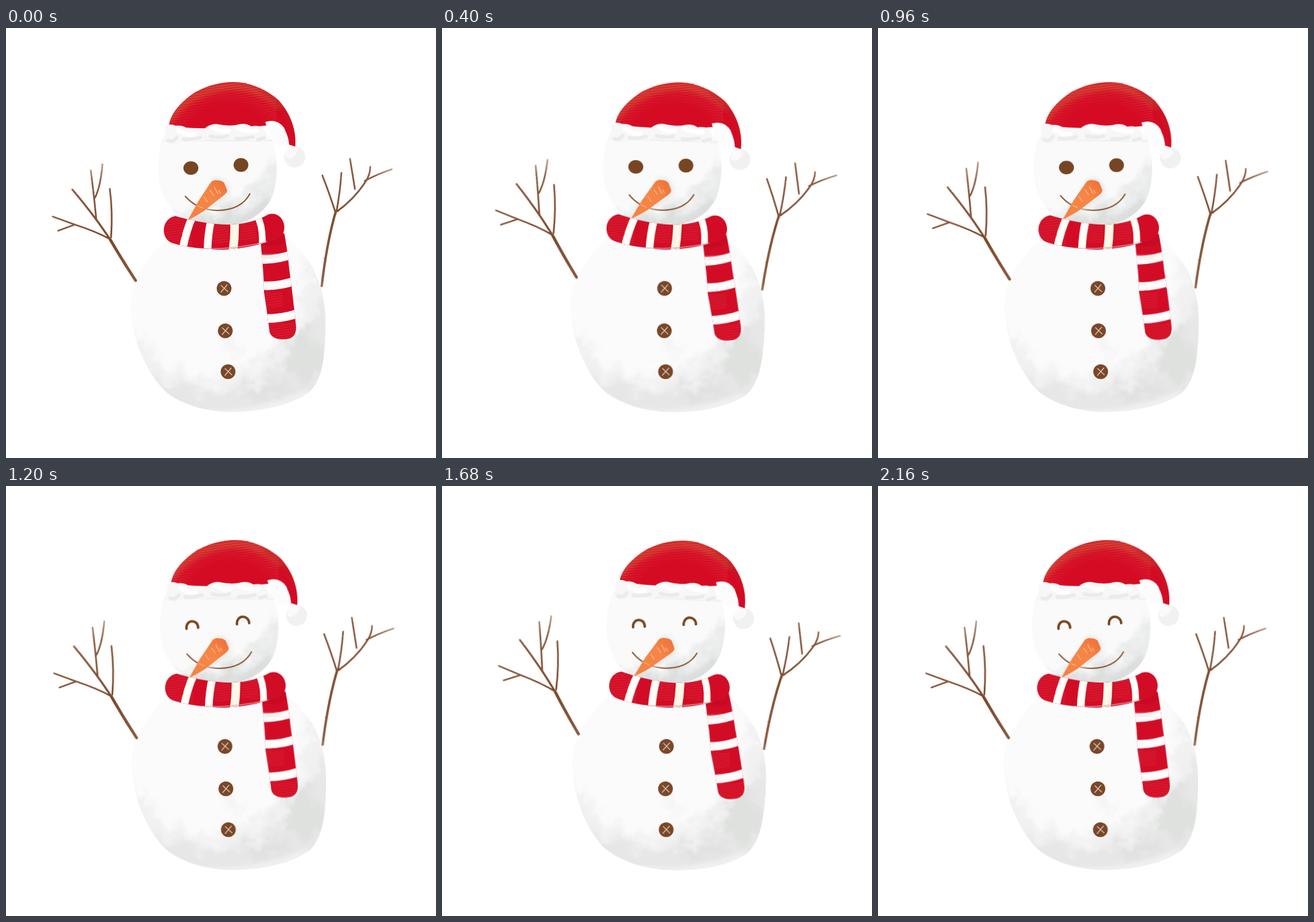
An HTML page for the animation above (2240 ms loop, 700 by 700 pixels).

```html
<!DOCTYPE html>
<html lang="en">
<head>
<meta charset="utf-8">
<title>Swaying snowman</title>
<style>
  html, body { margin: 0; width: 100%; height: 100%; overflow: hidden; background: #fff; }
  svg { display: block; width: 100%; height: 100%; }
  .line { fill: none; stroke-linecap: round; stroke-linejoin: round; }

  /* seven even steps out, seven back */
  .snowman { transform-origin: 362px 628px; --turn: 2.9deg; }
  .tail { transform-origin: 432px 345px; --turn: -5.3deg; }
  .snowman, .tail { animation: sway 1120ms -2ms infinite; }
  @keyframes sway {
    0%, 100% { transform: rotate(0deg); animation-timing-function: steps(7); }
    50% { transform: rotate(var(--turn)); animation-timing-function: steps(7); }
  }

  /* eyes open for one sway, smiling for the next */
  .open, .shut { animation: blink 2240ms -2ms step-end infinite; }
  .shut { animation-delay: -1122ms; }
  @keyframes blink { 0% { opacity: 1; } 50%, 100% { opacity: 0; } }
</style>
</head>
<body>
<svg viewBox="0 0 700 700">
  <defs>
    <filter id="rough" filterUnits="userSpaceOnUse" x="0" y="0" width="700" height="700" color-interpolation-filters="sRGB">
      <feTurbulence type="fractalNoise" baseFrequency=".35" numOctaves="1" seed="4"/>
      <feDisplacementMap in="SourceGraphic" scale="1.8" xChannelSelector="R" yChannelSelector="G"/>
    </filter>
    <filter id="wash" filterUnits="userSpaceOnUse" x="0" y="0" width="700" height="700" color-interpolation-filters="sRGB">
      <feGaussianBlur stdDeviation="7" result="soft"/>
      <feTurbulence type="fractalNoise" baseFrequency=".04" numOctaves="3" seed="9"/>
      <feDisplacementMap in="soft" scale="50" xChannelSelector="R" yChannelSelector="G"/>
    </filter>
    <filter id="soft" x="-40%" y="-40%" width="180%" height="180%"><feGaussianBlur stdDeviation="3.5"/></filter>

    <pattern id="knit" width="4" height="4" patternUnits="userSpaceOnUse" patternTransform="rotate(-8)">
      <path d="M0 1 2 3 4 1" fill="none" stroke="#f0a184" stroke-width=".8"/>
    </pattern>
    <radialGradient id="hatFade" gradientUnits="userSpaceOnUse" cx="362" cy="188" r="110" gradientTransform="translate(362 188) scale(1.12 1) translate(-362 -188)">
      <stop offset=".58" stop-color="#fff" stop-opacity="0"/>
      <stop offset=".86" stop-color="#fff" stop-opacity=".55"/>
      <stop offset="1" stop-color="#fff" stop-opacity=".3"/>
    </radialGradient>
    <mask id="hatMask" maskUnits="userSpaceOnUse" x="250" y="80" width="190" height="90">
      <rect x="250" y="80" width="190" height="90" fill="url(#hatFade)"/>
    </mask>
    <radialGradient id="leftWood" gradientUnits="userSpaceOnUse" cx="170" cy="345" r="128">
      <stop offset="0" stop-color="#7b4829"/>
      <stop offset=".75" stop-color="#8b5d44"/>
      <stop offset="1" stop-color="#c7a99b"/>
    </radialGradient>
    <radialGradient id="rightWood" gradientUnits="userSpaceOnUse" cx="534" cy="315" r="128">
      <stop offset="0" stop-color="#7f4e31"/>
      <stop offset=".75" stop-color="#8b5d44"/>
      <stop offset="1" stop-color="#c3a294"/>
    </radialGradient>
    <linearGradient id="carrot" x1="0" y1="1" x2="1" y2="0">
      <stop offset="0" stop-color="#f5823f"/>
      <stop offset=".6" stop-color="#f58647"/>
      <stop offset="1" stop-color="#ee6f35"/>
    </linearGradient>

    <path id="bodyShape" d="M270 338C236 362 204 408 203 450C203 508 232 567 262 594C290 615 330 625 368 625C420 624 468 612 494 592C517 570 520 530 520 475C519 420 500 380 464 346C400 318 320 316 270 338Z"/>
    <path id="headShape" d="M256 178C245 205 244 248 257 275C270 304 300 322 345 323C390 323 424 302 435 270C444 238 441 203 432 178C390 140 300 140 256 178Z"/>
    <path id="hatShape" d="M265 160C268 138 286 119 309 104C330 93 350 88 370 88C397 88 426 101 444 118C463 139 473 166 471 193L461 190C460 179 457 170 450 161L430 158Q350 168 265 160Z"/>
    <path id="collarShape" d="M276 306C295 312 330 320 366 320C392 319 412 312 426 304C440 299 451 308 453 322C454 335 446 346 431 346C416 352 390 359 352 361C320 360 286 356 268 349C255 342 254 324 262 314Q268 307 276 306Z"/>
    <path id="tailShape" d="M414 338C416 370 420 400 420 430C424 456 427 476 429 495C433 507 448 508 459 506C470 504 473 495 472 484C469 455 465 420 461 392C459 370 456 350 453 334Z"/>
    <clipPath id="inBody"><use href="#bodyShape"/></clipPath>
    <clipPath id="inHead"><use href="#headShape"/></clipPath>
    <clipPath id="inHat"><use href="#hatShape"/></clipPath>
    <clipPath id="inCollar"><use href="#collarShape"/></clipPath>
    <clipPath id="inTail"><use href="#tailShape"/></clipPath>

    <g id="button">
      <circle r="12" fill="#7a4728"/>
      <path class="line" d="M-5-5 6 5M5-6-5 6" stroke="#d9c8bb" stroke-width="1.4"/>
    </g>
  </defs>

  <g class="snowman">
    <g filter="url(#rough)">
      <!-- body -->
      <use href="#bodyShape" fill="#fbfbfb"/>
      <g clip-path="url(#inBody)">
        <g filter="url(#wash)">
          <path d="M185 455Q225 530 300 570Q380 570 425 525Q470 500 485 430L490 370L560 400V650H200Z" fill="#f0f1f0"/>
          <path d="M225 560Q300 600 370 590Q440 570 485 505L515 440L560 560L480 650H270Z" fill="#e6e7e6"/>
          <ellipse cx="485" cy="535" rx="28" ry="38" fill="#dfe1df"/>
          <ellipse cx="425" cy="590" rx="48" ry="13" fill="#e0e1e0"/>
          <ellipse cx="368" cy="522" rx="12" ry="10" fill="#f3f3f3"/>
        </g>
        <path d="M330 621Q400 627 490 588L500 640H300Z" fill="#eff0ef" filter="url(#soft)"/>
      </g>

      <!-- arms -->
      <g class="line" stroke="url(#leftWood)" stroke-width="2.8">
        <path d="M211 411Q188 376 170 345" stroke-width="4.6"/>
        <path d="M172 348Q158 327 147 312Q126 284 108 263" stroke-width="3.3"/>
        <path d="M170 344Q146 331 112 320L76 307M112 320 85 330"/>
        <path d="M171 341Q174 300 169 262M147 312Q143 270 138 232M145 276Q154 258 157 222"/>
      </g>
      <g class="line" stroke="url(#rightWood)" stroke-width="2.8">
        <path d="M514 420Q522 350 537 298" stroke-width="3.9"/>
        <path d="M537 302Q526 268 515 240M538 299Q544 266 546 236"/>
        <path d="M537 300Q568 278 586 249Q593 238 593 226M568 262 560 213"/>
        <path d="M584 249Q604 238 628 230"/>
      </g>

      <!-- head -->
      <use href="#headShape" fill="#fafafa"/>
      <g clip-path="url(#inHead)">
        <g filter="url(#wash)">
          <path d="M255 290Q320 312 375 280Q410 270 430 220L470 200L460 340H260Z" fill="#eaebeb"/>
          <path d="M285 318Q350 312 400 295L440 265V345H290Z" fill="#dcdede"/>
        </g>
        <path d="M262 184Q340 180 430 184" class="line" stroke="#eff0f0" stroke-width="10" filter="url(#soft)"/>
      </g>

      <!-- hat -->
      <use href="#hatShape" fill="#d50b24"/>
      <g clip-path="url(#inHat)">
        <path d="M268 145Q300 103 363 94Q405 92 445 125" class="line" stroke="#cf3a2c" stroke-width="14" filter="url(#soft)" opacity=".7"/>
        <rect x="250" y="80" width="190" height="90" fill="url(#knit)" mask="url(#hatMask)"/>
        <path d="M420 105Q455 130 468 165" class="line" stroke="#c11c27" stroke-width="7" filter="url(#soft)" opacity=".6"/>
      </g>
      <path d="M422 153Q442 147 453 163Q460 178 459 194L440 190Q428 176 422 153Z" fill="#fcfcfc"/>
      <circle cx="470" cy="210" r="17" fill="#f1f1f1"/>
      <path d="M454 203Q459 190 470 193Q478 198 472 205Q464 215 456 211Z" fill="#fafafa"/>
      <path d="M258 161Q265 154 276 159Q288 158 296 164Q308 166 323 164Q334 154 347 157Q362 160 374 158Q389 153 399 160Q413 157 420 165Q427 174 422 183Q412 189 400 183Q382 185 365 181Q346 185 331 180Q314 187 298 184Q283 183 276 189Q261 192 256 181Q262 171 258 161Z" fill="#f7f7f7"/>
      <g class="line" stroke="#e8e9e9" stroke-width="6" opacity=".8">
        <path d="M264 183Q272 187 278 178M289 181Q304 182 316 178M333 176Q348 180 360 176M375 180Q390 181 402 177M410 182 420 179"/>
      </g>
      <path d="M281 167Q298 177 306 173M337 162Q349 171 362 167M377 163Q394 170 407 167" class="line" stroke="#fff" stroke-width="7"/>

      <!-- face -->
      <g class="open" fill="#774522">
        <ellipse cx="301" cy="228" rx="12.2" ry="11"/>
        <ellipse cx="382.5" cy="223" rx="12" ry="11.3"/>
      </g>
      <g class="shut line" stroke="#784720" stroke-width="4">
        <path d="M291 233C289 218 309 216 310 231"/>
        <path d="M373 225C372 209 392 209 393 223"/>
      </g>
      <path d="M292 274Q312 297 345 297Q383 296 397 270" class="line" stroke="#8a5a38" stroke-width="2.1"/>
      <path d="M337 246Q353 240 363 260Q364 272 350 282L325 300Z" fill="#e5e6e6" filter="url(#soft)"/>
      <path d="M296 313L313 282L333 252Q337 247 344 248Q351 248 355 252L360 264Q360 269 351 275L322 298Q308 307 296 313Z" fill="url(#carrot)"/>
      <path d="M332 264 338 272M339 259 345 270M346 264 349 269M322 275 328 283M311 289 320 293" class="line" stroke="#ffc49b" stroke-width="1.2"/>

      <!-- scarf -->
      <g class="tail">
        <use href="#tailShape" fill="#d30c26"/>
        <g clip-path="url(#inTail)">
          <path d="M425 480H475V510H425ZM420 430H450V455H420Z" fill="url(#knit)" opacity=".25"/>
          <path d="M415 345Q436 358 454 340" class="line" stroke="#b10d23" stroke-width="5" filter="url(#soft)" opacity=".7"/>
          <g class="line" stroke="#fdfcfb" stroke-width="14">
            <path d="M410 376Q437 379 468 368M412 419Q442 422 472 411M418 473Q449 474 480 463"/>
          </g>
          <path d="M415 373Q435 376 446 369" class="line" stroke="#e9e3e2" stroke-width="5" filter="url(#soft)"/>
        </g>
      </g>
      <use href="#collarShape" fill="#d30c26"/>
      <g clip-path="url(#inCollar)">
        <path d="M255 300H302V362H255ZM335 315H362V350H335ZM382 312H408V346H382Z" fill="url(#knit)" opacity=".25"/>
        <path d="M264 351Q340 370 420 350" class="line" stroke="#bb1026" stroke-width="3" opacity=".5"/>
        <g class="line" stroke="#fffdf8" stroke-width="12.5">
          <path d="M304 306Q292 333 287 364M334 312Q328 338 328 368"/>
          <path d="M372 314Q373 340 369 366" stroke="#fcf7e6" stroke-width="14"/>
          <path d="M408 304Q419 323 417 354" stroke-width="11"/>
        </g>
        <path d="M280 356Q350 366 425 348" class="line" stroke="#d9a9a9" stroke-width="2" opacity=".7"/>
      </g>

      <use href="#button" x="355" y="424"/>
      <use href="#button" x="357" y="493"/>
      <use href="#button" x="361.5" y="559.5"/>
    </g>
  </g>
</svg>
</body>
</html>
```
